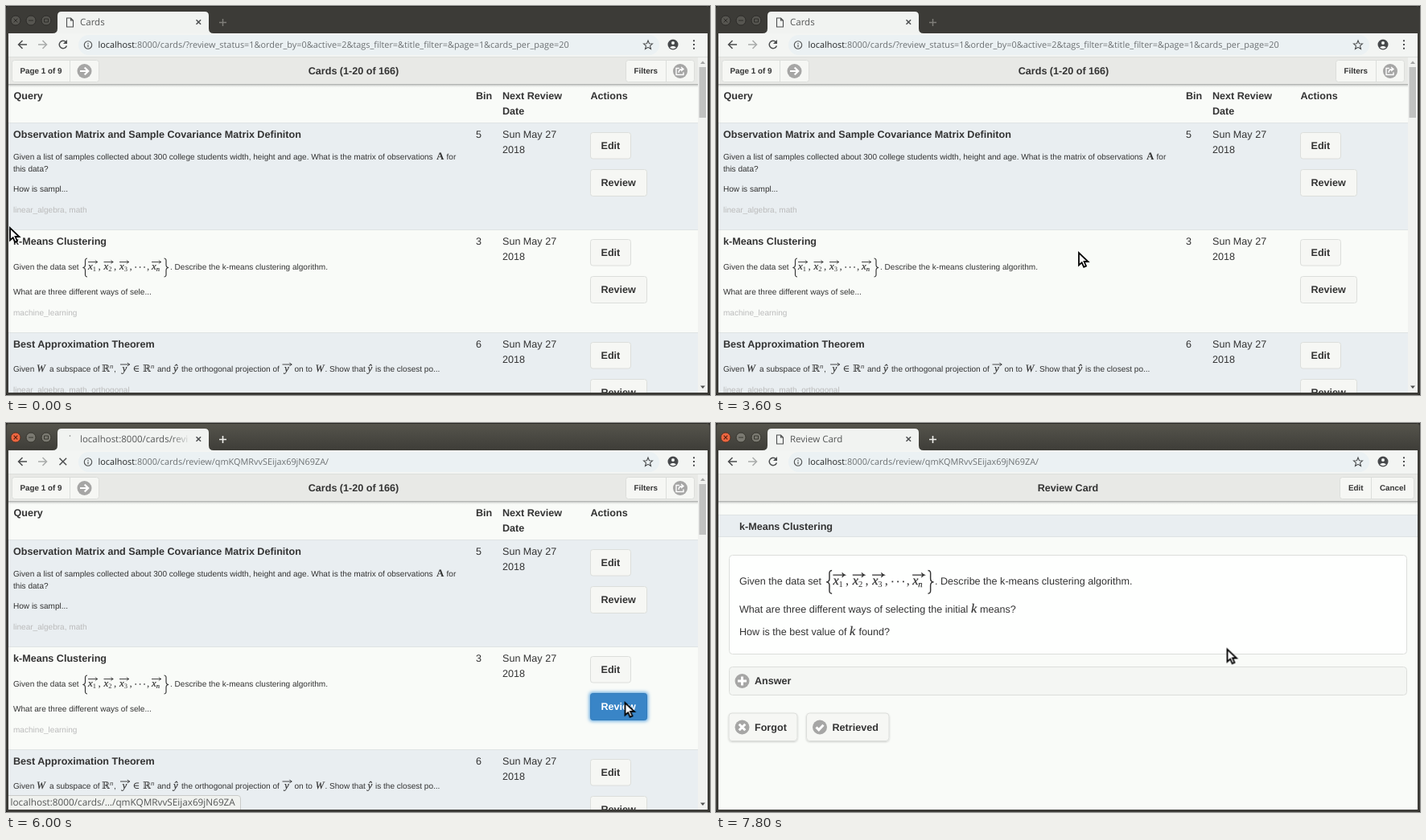
Recreate the animation shown at these times as an HTML page. Size 875x484 px, loop 8 s.

```html
<!DOCTYPE html>
<html lang="en">
<head>
<meta charset="utf-8">
<title>Card review</title>
<style>
html, body { margin: 0; width: 100%; height: 100%; overflow: hidden; background: #22211f; }
svg { display: block; width: 100%; height: 100%; text-rendering: geometricPrecision; }

text { font: 12.58px "Liberation Sans", sans-serif; fill: #333; white-space: pre; }
.b { font-weight: bold; }
.s { font-size: 10.06px; }
.h { font-size: 9.83px; font-weight: bold; }
.tag { font-size: 10.06px; fill: #bbb; }
.raw { fill: #8b8b8b; }
.mid { text-anchor: middle; }
.ui { font: 11.5px "Open Sans", sans-serif; fill: #555757; }
.url { font-size: 10.88px; fill: #6c7072; }
.url tspan { fill: #222425; }
.link { font-size: 11.75px; }
.m { font: italic 13px "Liberation Serif", "DejaVu Serif", serif; stroke: #333; stroke-width: .2; }
.m .sub { font-size: 8.5px; font-style: italic; }
.n, .m .n { font-style: normal; stroke: none; }
.set { font-size: 12px; }
.matrix { font-weight: bold; }
.big { font-size: 16px; }
.line { fill: none; stroke: #333; stroke-width: .9; }
.brace { stroke-width: 1.15; }
.icon { fill: none; stroke: #4c4e4f; stroke-width: 1.5; }
.thin { stroke-width: 1.1; }
.btn { fill: #f6f7f4; stroke: #dcdedb; }
.split { stroke: #dcdedb; }
.disc { fill: #a6a6a5; }
.mark { fill: none; stroke: #fff; stroke-width: 2.2; }
.bold { stroke-width: 3; }
.band { fill: #e9eef1; stroke: #dee3e4; }

/* One step every 200 ms is 2.5% of the loop. */
.active, .idle, .home, .addr, .loading, .review, .raweq, .eq, .shift,
.hover, .press, .status, .cursor { animation: 8s step-end infinite; }
.press, .active { animation-name: on-click; }
.idle { animation-name: off-click; }
.home { animation-name: off-load; }
.addr { animation-name: on-load; }
.loading { animation-name: loading; }
.review { animation-name: on-page; }
.raweq { animation-name: off-math; }
.eq { animation-name: on-math; }
.shift { animation-name: shift; }
.hover { animation-name: hover; }
.status { animation-name: status; }
.cursor { animation-name: move, blink; }
@keyframes on-click { 0% { opacity: 0 } 72.5%, 100% { opacity: 1 } }
@keyframes off-click { 0% { opacity: 1 } 72.5%, 100% { opacity: 0 } }
@keyframes on-load { 0% { opacity: 0 } 75%, 100% { opacity: 1 } }
@keyframes off-load { 0% { opacity: 1 } 75%, 100% { opacity: 0 } }
@keyframes loading { 0% { opacity: 0 } 75% { opacity: 1 } 77.5%, 100% { opacity: 0 } }
@keyframes on-page { 0% { opacity: 0 } 77.5%, 100% { opacity: 1 } }
@keyframes on-math { 0% { opacity: 0 } 82.5%, 100% { opacity: 1 } }
@keyframes off-math { 0% { opacity: 1 } 82.5%, 100% { opacity: 0 } }
@keyframes shift { 0% { transform: none } 82.5%, 100% { transform: translateY(14px) } }
@keyframes hover { 0% { opacity: 0 } 62.5%, 100% { opacity: 1 } }
@keyframes status { 0% { opacity: 0 } 65% { opacity: 1 } 77.5% { opacity: .3 } 80%, 100% { opacity: 0 } }
@keyframes blink { 0% { opacity: 1 } 77.5% { opacity: 0 } 80%, 100% { opacity: 1 } }
@keyframes move {
  0% { transform: translate(4px, 275px) }
  15% { transform: translate(120px, 297px) }
  17.5% { transform: translate(520px, 250px) }
  20% { transform: translate(783px, 150px) }
  22.5% { transform: translate(600px, 43px) }
  25% { transform: translate(330px, 110px) }
  27.5% { transform: translate(262px, 254px) }
  30% { transform: translate(256.5px, 266px) }
  32.5% { transform: translate(272px, 270px) }
  35% { transform: translate(305px, 278px) }
  37.5% { transform: translate(345px, 287px) }
  40% { transform: translate(385px, 296px) }
  42.5% { transform: translate(409px, 302px) }
  45% { transform: translate(450px, 306px) }
  47.5% { transform: translate(510px, 312px) }
  50% { transform: translate(575px, 319px) }
  52.5% { transform: translate(635px, 326px) }
  55% { transform: translate(685px, 332px) }
  57.5% { transform: translate(704px, 333.5px) }
  60% { transform: translate(718px, 337px) }
  62.5% { transform: translate(742px, 342px) }
  65% { transform: translate(760px, 346px) }
  67.5% { transform: translate(768.5px, 347px) }
  90% { transform: translate(420px, 342px) }
  92.5% { transform: translate(17px, 341px) }
  95% { transform: translate(330px, 300px) }
  97.5%, 100% { transform: translate(634.5px, 280.5px) }
}
</style>
</head>
<body>
<svg viewBox="0 0 875 484">
<defs>
  <linearGradient id="bar" x2="0" y2="1"><stop stop-color="#55544c"/><stop offset="1" stop-color="#3e3d38"/></linearGradient>
  <linearGradient id="shade" x2="0" y2="1"><stop stop-color="#a3a5a3"/><stop offset="1" stop-color="#f9fbf8" stop-opacity="0"/></linearGradient>
  <linearGradient id="fade" gradientUnits="userSpaceOnUse" x1="205" x2="230"><stop stop-color="#555757"/><stop offset="1" stop-color="#555757" stop-opacity="0"/></linearGradient>
  <filter id="glow" x="-20%" y="-40%" width="140%" height="180%"><feGaussianBlur stdDeviation="2.2"/></filter>
  <filter id="drop" x="-10%" y="-20%" width="120%" height="150%"><feDropShadow dx="0" dy="1" stdDeviation="1" flood-opacity=".18"/></filter>
  <clipPath id="view"><rect x="3" y="64" width="869" height="417"/></clipPath>

  <g id="controls">
    <circle cx="12" cy="18" r="6"/><circle cx="31" cy="18" r="6"/><circle cx="50" cy="18" r="6"/>
    <path d="M9.7 15.7l4.6 4.6m0-4.6l-4.6 4.6M28 18h6M47.5 16h5v4h-5z" fill="none"/>
  </g>
  <path id="file" class="icon thin" d="M75.5 15H80.5L83.5 18V26H75.5ZM80.5 15V18H83.5"/>
  <g id="reload">
    <path d="M74.5 45A4.7 4.7 0 1 0 75.4 49.5" class="icon"/><path d="M76 42v5h-5z" fill="#4c4e4f"/>
  </g>
  <g id="actions">
    <rect class="btn" x="726.5" y="157.5" width="50" height="32.5" rx="3"/>
    <text class="b" x="739.5" y="178">Edit</text>
    <rect class="btn" x="726.5" y="203.5" width="70" height="33" rx="3"/>
    <text class="b" x="739.5" y="224">Review</text>
    <text x="617" y="164">Sun May 27</text><text x="617" y="183">2018</text>
  </g>
  <path id="brace" class="line brace" d="M6.5 -14C3.4 -14 4 -11 4 -9V-6C4 -4 3 -2.5 .8 -2.5C3 -2.5 4 -1 4 1V4C4 6 3.4 9 6.5 9"/>
  <path id="vec" class="line" d="M0 0H11.5M9 -2.2Q10 -.5 11.8 0Q10 .5 9 2.2"/>
  <g id="dataset">
    <use href="#brace"/><use href="#brace" transform="translate(108.5) scale(-1 1)"/>
    <use href="#vec" x="7.5" y="-9.5"/><use href="#vec" x="27" y="-9.5"/><use href="#vec" x="46.5" y="-9.5"/><use href="#vec" x="86.5" y="-9.5"/>
    <text class="m" x="7.5">x<tspan class="n sub" dy="2">1</tspan></text><text class="m n" x="20">,</text>
    <text class="m" x="27">x<tspan class="n sub" dy="2">2</tspan></text><text class="m n" x="39.5">,</text>
    <text class="m" x="46.5">x<tspan class="n sub" dy="2">3</tspan></text><text class="m n" x="59">,</text>
    <path d="M66 -3h1.4m4 0h1.4m4 0h1.4" stroke="#333" stroke-width="1.4"/>
    <text class="m n" x="80.5">,</text>
    <text class="m" x="86.5">x<tspan class="sub" dy="2">n</tspan></text>
  </g>
  <g id="top">
    <rect x="3" y="64" width="869" height="33" fill="#e8e9e6"/>
    <rect x="3" y="97" width="869" height="5" fill="url(#shade)"/>
  </g>
</defs>

<!-- window frame -->
<rect width="875" height="484" rx="4" fill="#3c3b37"/>
<rect class="active" x="1" y="1" width="873" height="33" rx="3" fill="url(#bar)"/>
<path d="M4 .5H871" stroke="#2a2926"/>
<use href="#controls" class="idle" fill="#565550" stroke="#2d2c29"/>
<g class="active">
  <use href="#controls" fill="#7a7971" stroke="#37362f"/>
  <circle cx="12" cy="18" r="6" fill="#ed6640" stroke="#5c3828"/>
  <path d="M9.7 15.7l4.6 4.6m0-4.6l-4.6 4.6" stroke="#5a2413" stroke-width="1.2"/>
</g>
<path d="M58 34Q64 34 64 28V12Q64 7 69 7H247Q252 7 252 12V28Q252 34 258 34Z" fill="#f1f3f1"/>
<path d="M236.5 17.2l5.6 5.6m0-5.6l-5.6 5.6" class="icon"/>
<path class="idle" d="M265 20.5h9m-4.5-4.5v9" stroke="#7f7e79" stroke-width="1.4"/>
<path class="active" d="M265 20.5h9m-4.5-4.5v9" stroke="#eeeeea" stroke-width="1.6"/>
<g class="home"><use href="#file"/><text class="ui" x="92" y="24">Cards</text></g>
<g class="loading">
  <circle cx="79.5" cy="16" r=".8" fill="#777"/>
  <text class="ui" x="92" y="24" style="fill:url(#fade)">localhost:8000/cards/revi</text>
</g>
<g class="review"><use href="#file"/><text class="ui" x="92" y="24">Review Card</text></g>

<!-- toolbar -->
<rect x="3" y="34" width="869" height="30" fill="#f3f5f3"/>
<path d="M3 63.5H872" stroke="#dcdfdc"/>
<rect x="90" y="36" width="722" height="25" rx="12.5" fill="#ebf1f3"/>
<path d="M26 48H15.5M20.5 43l-5 5 5 5" class="icon"/>
<path d="M40 48H50.5M45.5 43l5 5-5 5" class="icon" style="stroke:#a9acab"/>
<use href="#reload" class="home"/>
<path class="loading icon" d="M66.5 43.7l8.6 8.6m0-8.6l-8.6 8.6"/>
<use href="#reload" class="review"/>
<circle cx="102" cy="48.5" r="4.7" class="icon thin"/>
<path d="M102 46v1.2m0 1v3" class="icon thin"/>
<text class="ui url home" x="114.5" y="52"><tspan>localhost</tspan>:8000/cards/?review_status=1&amp;order_by=0&amp;active=2&amp;tags_filter=&amp;title_filter=&amp;page=1&amp;cards_per_page=20</text>
<text class="ui url addr" x="114.5" y="52"><tspan>localhost</tspan>:8000/cards/review/qmKQMRvvSEijax69jN69ZA/</text>
<path d="M798 43l1.5 3.7 4 .3-3 2.6 1 3.9-3.5-2.1-3.5 2.1 1-3.9-3-2.6 4-.3z" class="icon thin"/>
<circle cx="829" cy="48" r="6.5" fill="#46484a"/>
<circle cx="829" cy="46" r="2" fill="#f3f5f3"/><path d="M825 51.5q4-3.5 8 0q-4 3.5-8 0" fill="#f3f5f3"/>
<path d="M855 42.3v2m0 2.7v2m0 2.7v2" class="icon" style="stroke-width:2"/>

<!-- card list -->
<g clip-path="url(#view)">
  <rect x="3" y="64" width="869" height="417" fill="#f9fbf8"/>
  <rect class="band" x="2.5" y="145.5" width="858" height="133"/>
  <rect class="band" x="2.5" y="406.5" width="858" height="90"/>
  <use href="#top"/>
  <rect class="btn" x="7.5" y="67.5" width="108" height="27" rx="3"/>
  <path class="split" d="M79.5 68v26"/>
  <text class="h" x="17.5" y="84">Page 1 of 9</text>
  <circle class="disc" cx="97.5" cy="81" r="9"/>
  <path class="mark" d="M92 81h10m-4.3-4.5l4.5 4.5-4.5 4.5"/>
  <text class="b mid" x="432" y="85">Cards (1-20 of 166)</text>
  <rect class="btn" x="770.5" y="67.5" width="85" height="27" rx="3"/>
  <path class="split" d="M820.5 68v26"/>
  <text class="h" x="780.5" y="84">Filters</text>
  <circle class="disc" cx="838" cy="81" r="9"/>
  <path class="mark" style="stroke-width:1.4" d="M837 77.5h-4v8h9v-3M836 83q0-4.5 5-4.5m-2-2.5l3 2.5-3 2.5"/>

  <text class="b" x="9.5" y="116">Query</text><text class="b" x="584" y="116">Bin</text>
  <text class="b" x="617" y="116">Next Review</text><text class="b" x="617" y="135">Date</text>
  <text class="b" x="726.5" y="116">Actions</text>

  <text class="b" x="9" y="164">Observation Matrix and Sample Covariance Matrix Definiton</text>
  <text class="s" x="9" y="191">Given a list of samples collected about 300 college students width, height and age. What is the matrix of observations</text>
  <text class="m n matrix" x="535" y="191">A</text>
  <text class="s" x="547.5" y="191">for</text>
  <text class="s" x="9" y="206">this data?</text><text class="s" x="9" y="231">How is sampl...</text>
  <text class="tag" x="9" y="257">linear_algebra, math</text>
  <text x="584" y="164">5</text>
  <use href="#actions"/>

  <text class="b" x="9" y="297">k-Means Clustering</text>
  <text class="s" x="9" y="328">Given the data set</text>
  <use href="#dataset" x="94.5" y="328"/>
  <text class="s" x="204" y="328">. Describe the k-means clustering algorithm.</text>
  <text class="s" x="9" y="359">What are three different ways of sele...</text>
  <text class="tag" x="9" y="385">machine_learning</text>
  <text x="584" y="297">3</text>
  <use href="#actions" y="133"/>
  <g class="hover">
    <rect class="btn" style="fill:#ebecea" x="726.5" y="336.5" width="70" height="33" rx="3"/>
    <text class="b" x="739.5" y="357">Review</text>
  </g>
  <g class="press">
    <rect x="725" y="335" width="73" height="36" rx="4" fill="#58a2de" filter="url(#glow)"/>
    <rect x="726.5" y="336.5" width="70" height="33" rx="3" fill="#3985c7" stroke="#347dbb"/>
    <text class="b" x="739.5" y="357" style="fill:#fff">Review</text>
  </g>

  <text class="b" x="9" y="425">Best Approximation Theorem</text>
  <text class="s" x="9" y="455">Given</text><text class="m" x="38" y="455">W</text>
  <text class="s" x="54" y="455">a subspace of</text>
  <text class="m n set" x="119" y="455">ℝ<tspan class="sub" dy="-4">n</tspan></text>
  <text class="s" x="134" y="455">,</text>
  <use href="#vec" x="142" y="446"/><text class="m" x="144.5" y="455">y</text>
  <text class="m n set" x="157.5" y="455">∈</text>
  <text class="m n set" x="170" y="455">ℝ<tspan class="sub" dy="-4">n</tspan></text>
  <text class="s" x="188" y="455">and</text><text class="m" x="208" y="455">ŷ</text>
  <text class="s" x="218" y="455">the orthogonal projection of</text>
  <use href="#vec" x="343.5" y="446"/><text class="m" x="346" y="455">y</text>
  <text class="s" x="358.5" y="455">on to</text><text class="m" x="384.5" y="455">W</text>
  <text class="s" x="396.5" y="455">. Show that</text><text class="m" x="449.5" y="455">ŷ</text>
  <text class="s" x="459" y="455">is the closest po...</text>
  <text class="tag" x="9" y="481">linear_algebra, math, orthogonal</text>
  <text x="584" y="425">6</text>
  <use href="#actions" y="261"/>

  <rect x="860" y="64" width="12" height="417" fill="#f1f2f0"/>
  <rect x="861.5" y="76" width="8.5" height="63" fill="#c1c2c1"/>
  <path d="M863 72l3-3.5 3 3.5z" fill="#a3a4a3"/><path d="M863 472.5l3 3.5 3-3.5z" fill="#505150"/>
</g>

<!-- single card -->
<g class="review" clip-path="url(#view)">
  <rect x="3" y="64" width="869" height="417" fill="#f9fbf8"/>
  <use href="#top"/>
  <text class="b mid" x="437.5" y="85">Review Card</text>
  <rect class="btn" x="775.5" y="67.5" width="92" height="27" rx="3"/>
  <path class="split" d="M814.5 68v26"/>
  <text class="h" x="786" y="84">Edit</text><text class="h" x="825" y="84">Cancel</text>
  <rect class="band" x="2.5" y="114.5" width="870" height="27"/>
  <text class="b" x="29" y="133">k-Means Clustering</text>
  <g class="raweq">
    <rect x="16.5" y="164.5" width="842" height="108" rx="4" fill="#fefffe" stroke="#dcdedb"/>
    <text x="29" y="194">Given the data set <tspan class="raw">{vec{x_1} , vec{x_2} , vec{x_3} , cdots , vec{x_n}}</tspan>. Describe the k-means clustering algorithm.</text>
    <text x="29" y="222">What are three different ways of selecting the initial <tspan class="raw">k</tspan> means?</text>
    <text x="29" y="250">How is the best value of <tspan class="raw">k</tspan> found?</text>
  </g>
  <g class="eq">
    <rect x="16.5" y="164.5" width="842" height="123" rx="4" fill="#fefffe" stroke="#dcdedb"/>
    <text x="29" y="201">Given the data set</text>
    <use href="#dataset" transform="translate(136 201) scale(1.25)"/>
    <text x="272" y="201">. Describe the k-means clustering algorithm.</text>
    <text x="29" y="236">What are three different ways of selecting the initial</text>
    <text class="m big" x="317" y="236">k</text><text x="328" y="236">means?</text>
    <text x="29" y="264">How is the best value of</text>
    <text class="m big" x="166" y="264">k</text><text x="177.5" y="264">found?</text>
  </g>
  <g class="shift">
    <rect class="btn" style="fill:#f4f6f3" x="16.5" y="289.5" width="842" height="35" rx="4"/>
    <g filter="url(#drop)">
      <rect class="btn" x="16" y="347" width="85" height="34.5" rx="4"/>
      <rect class="btn" x="112.5" y="347" width="102.500" height="34.5" rx="4"/>
    </g>
    <circle class="disc" cx="32.5" cy="307" r="9"/><path class="mark bold" d="M27 307h11m-5.5-5.5v11"/>
    <circle class="disc" cx="32.5" cy="364.5" r="9"/><path class="mark bold" d="M28.7 360.7l7.6 7.6m0-7.6l-7.6 7.6"/>
    <circle class="disc" cx="129" cy="364.5" r="9"/><path class="mark bold" d="M124.5 364.5l3.3 3.3 5.7-6"/>
    <text class="b" x="48" y="311">Answer</text>
    <text class="b" x="48" y="369">Forgot</text>
    <text class="b" x="144.5" y="369">Retrieved</text>
  </g>
</g>

<g class="status">
  <path d="M3 463.5H288Q291.5 463.5 291.5 467V481H3Z" fill="#f0f2ef"/>
  <path d="M3 463.5H288Q291.5 463.5 291.5 467V481" fill="none" stroke="#c9cbc9"/>
  <text class="ui link" x="5.5" y="476">localhost:8000/cards/…/qmKQMRvvSEijax69jN69ZA</text>
</g>

<g class="cursor">
  <path d="M1 1V16.5L4.7 13.2L7.2 18.8L10 17.5L7.6 12H12.5Z" fill="#fff" stroke="#000" stroke-width="1.8"/>
</g>
</svg>
</body>
</html>
```
